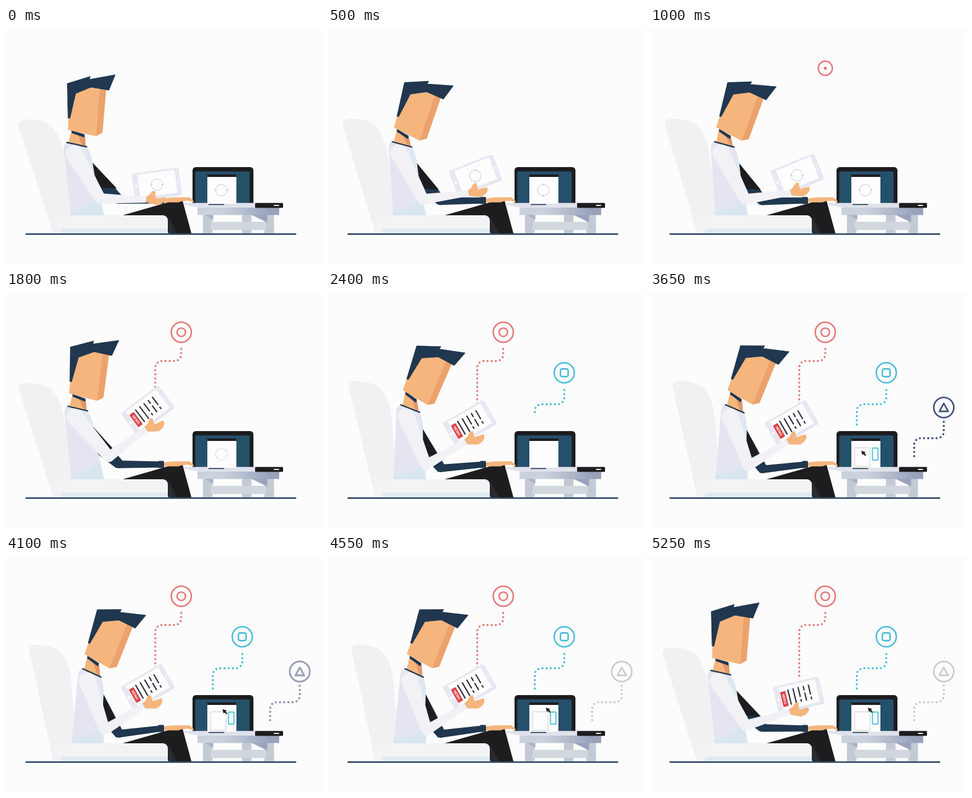
An HTML page with a canvas for the animation above (5.3 s loop, 576 by 431 pixels).

```html
<!DOCTYPE html>
<html lang="en">
<head>
<meta charset="utf-8">
<title>Connected devices</title>
<style>
html, body { margin: 0; width: 100%; height: 100%; overflow: hidden; background: #fcfcfc; }
canvas { display: block; width: 576px; height: 431px; }
</style>
</head>
<body>
<canvas id="stage"></canvas>
<script>
const W = 576, H = 431, LOOP = 5300, STEP = 50;
const canvas = document.getElementById('stage');
const c = canvas.getContext('2d');
const dpr = window.devicePixelRatio || 1;
canvas.width = W * dpr;
canvas.height = H * dpr;

const NAVY = '#20374f', BLACK = '#1d1d1f', SKIN = '#f5b57d', SHADE = '#eca26c';
const SHIRT = '#e4e5f0', SLEEVE = '#f1f1f6', MIST = '#d8e6f0', CHAIR = '#f1f1f3';
const RED = '#e57b79', CYAN = '#4fbfd9', INDIGO = '#3f527b', GREY = '#c8cad1';
const HIP = [140, 345];

const rest = { lean: 0, nod: 0, x: 275, y: 285, tilt: -7.5 };
const glance = { lean: 2.8, nod: 15.3, x: 268, y: 268, tilt: -22 };
const raise = { lean: 0.8, nod: 2.6, x: 258, y: 216, tilt: -37 };
const study = { lean: 9, nod: 18.6, x: 258, y: 239.5, tilt: -30 };
const bent = { ...study, lean: 12.2, nod: 16.8 };
const relax = { ...rest, x: 271, y: 254, tilt: -13.5 };
const MOVES = [[0, 600, rest, glance], [1100, 700, glance, raise], [1800, 550, raise, study],
  [2350, 2200, study, bent], [4550, 700, bent, relax]];

const rad = d => d * Math.PI / 180;
const clamp = v => Math.max(0, Math.min(1, v));
const part = (t, start, dur) => clamp((t - start) / dur);
const smooth = p => (1 - Math.cos(Math.PI * p)) / 2;
const easeOut = (p, n) => 1 - Math.pow(1 - p, n);
const mix = (a, b, p) => a + (b - a) * p;

function turn(x, y, deg, [ox, oy]) {
  const s = Math.sin(rad(deg)), k = Math.cos(rad(deg));
  return [ox + x * k - y * s, oy + x * s + y * k];
}

// Elbow of a two-bone arm, bending downwards.
function bend(a, b, upper, lower) {
  const dx = b[0] - a[0], dy = b[1] - a[1], d = Math.hypot(dx, dy);
  const along = (d * d + upper * upper - lower * lower) / (2 * d);
  const out = Math.sqrt(Math.max(0, upper * upper - along * along));
  return [a[0] + (dx * along - dy * out) / d, a[1] + (dy * along + dx * out) / d];
}

function poseAt(t) {
  const [start, dur, a, b] = MOVES.filter(m => m[0] <= t).pop();
  const p = smooth(part(t, start, dur)), pose = {};
  for (const key in a) pose[key] = mix(a[key], b[key], p);

  const lean = pose.lean;
  pose.body = (x, y) => turn(x - HIP[0], y - HIP[1], lean, HIP);
  pose.neck = pose.body(125, 187).map(v => v - lean * 0.3);
  pose.tab = [pose.x, pose.y];
  pose.wrist = turn(-23, 26, pose.tilt, pose.tab);
  pose.shoulder = pose.body(124, 229);
  pose.elbow = bend(pose.shoulder, pose.wrist, 95, 84);
  pose.farElbow = [204, 314 + lean * 0.9];
  pose.lift = smooth(part(t, 2650, 200)) * (1 - smooth(part(t, 2950, 200)));
  return pose;
}

function poly(color, pts, soft = 0) {
  c.fillStyle = c.strokeStyle = color;
  c.beginPath();
  pts.forEach(p => c.lineTo(p[0], p[1]));
  c.closePath();
  c.fill();
  if (!soft) return;
  c.lineWidth = soft;
  c.lineJoin = 'round';
  c.stroke();
}

function box(color, x, y, w, h, r = 0) {
  c.fillStyle = color;
  c.beginPath();
  c.roundRect(x, y, w, h, r);
  c.fill();
}

function frame(color, w, x, y, bw, bh, r) {
  c.strokeStyle = color;
  c.lineWidth = w;
  c.beginPath();
  c.roundRect(x, y, bw, bh, r);
  c.stroke();
}

function line(color, w, a, b, cap = 'round') {
  c.lineCap = cap;
  c.strokeStyle = color;
  c.lineWidth = w;
  c.beginPath();
  c.moveTo(...a);
  c.lineTo(...b);
  c.stroke();
}

function disc(color, x, y, r) {
  c.fillStyle = color;
  c.beginPath();
  c.arc(x, y, r, 0, 7);
  c.fill();
}

function limb(color, a, b, wa, wb) {
  const dx = b[0] - a[0], dy = b[1] - a[1], d = Math.hypot(dx, dy) * 2;
  const side = (p, w) => [p[0] - dy / d * w, p[1] + dx / d * w];
  poly(color, [side(a, wa), side(b, wb), side(b, -wb), side(a, -wa)]);
}

function group([x, y], deg, draw) {
  c.save();
  c.translate(x, y);
  c.rotate(rad(deg));
  draw();
  c.restore();
}

function pivot(at, deg, draw) {
  group(at, deg, () => {
    c.translate(-at[0], -at[1]);
    draw();
  });
}

function refresh(x, y, t, alpha) {
  c.globalAlpha = alpha;
  group([x, y], t * 0.18, () => {
    for (let k = 0; k < 2; k++) {
      c.rotate(Math.PI);
      c.strokeStyle = '#d6d7dd';
      c.lineWidth = 1.3;
      c.beginPath();
      c.arc(0, 0, 10.5, 0.15, 2.75);
      c.stroke();
      poly('#cfd0d8', [[8, 1], [13, 1], [10.5, -3]]);
    }
  });
  c.globalAlpha = 1;
}

function chairBack(lean) {
  pivot([100, 374], lean * 0.48, () => {
    c.fillStyle = CHAIR;
    c.beginPath();
    c.moveTo(86, 375);
    c.lineTo(22, 177);
    c.quadraticCurveTo(22, 168, 36, 167);
    c.lineTo(50, 167.5);
    c.bezierCurveTo(78, 168, 95, 184, 104, 225);
    c.lineTo(126, 345);
    c.lineTo(122, 375);
    c.fill();
  });
}

function seat() {
  box('#f3f3f5', 86, 342, 209, 33, [0, 9, 0, 0]);
  box('#e0eaf2', 100, 366, 195, 9);
}

function legs() {
  poly(BLACK, [[211, 342.5], [300, 317], [319, 312], [322, 316], [338, 375], [296, 375], [285, 345]]);
  poly('#2b2b2f', [[296, 345], [311, 375], [296, 375]]);
}

function table() {
  [359, 430, 471].forEach(x => box('#c3cad3', x, 340, 17.5, 35));
  box('#d0d7dd', 373, 354, 101, 15);
  poly('#9ba2bb', [[447, 341], [476, 341], [476, 355]]);
  poly('#a9b2c6', [[361, 341], [378, 341], [378, 350]]);
  const top = c.createLinearGradient(349, 0, 498, 0);
  top.addColorStop(0.3, '#cbd1de');
  top.addColorStop(0.9, '#98a2bb');
  box(top, 349, 328, 149, 13.5);
}

function laptop(t) {
  box(BLACK, 340, 254, 111, 68, [6, 6, 0, 0]);
  box('#25506a', 345, 262, 99, 58, 2);
  poly('#dfe2ec', [[323, 319.5], [454, 319.5], [454, 328], [352, 328], [326, 323]]);
  box('#fdfdfd', 367, 268, 53, 53);
  box(BLACK, 367, 267.5, 53, 4.5);
  refresh(392.5, 296, t, 1 - part(t, 1600, 600));

  c.save();
  c.beginPath();
  c.rect(367, 272, 53, 49);
  c.clip();
  const slide = start => 40 * (1 - easeOut(part(t, start, 600), 3));
  if (t > 2690) {
    frame('#d5d6da', 1.3, 373, 284.5 + slide(2690), 28, 34, 0);
    frame(CYAN, 2, 405.5, 285 + slide(2750), 10, 22, 1);
  }
  c.restore();

  c.globalAlpha = part(t, 3250, 150);
  const p = smooth(part(t, 3750, 500));
  group([mix(385, 397, p), mix(290, 277, p)], 0, () =>
    poly(BLACK, [[0, 0], [8, 2.4], [6, 4.2], [9, 7.8], [7.2, 9.4], [4, 6], [2.2, 8]]));
  c.globalAlpha = 1;
  line(NAVY, 1.8, [370, 322.3], [397, 322.3]);

  box(BLACK, 454, 319.5, 51, 9, 1.5);
  line('#f2f2f4', 1.8, [489, 324], [497, 324]);
}

function farArm({ farElbow: [x, y], lift, body }) {
  const wrist = [283, 315 - 9 * lift];
  const top = body(154, 242), low = body(160, 291);
  poly(NAVY, [top, [x + 8, y - 7], [x - 3, y + 7], low]);
  poly(BLACK, [top, [x - 2, y - 21], low]);
  limb(NAVY, [x, y], wrist, 14, 11);
  disc(NAVY, x + 1, y, 7);

  group([287, wrist[1]], -18 * lift, () => {
    poly(SKIN, [[0, -3], [14, -5], [46, -5.5], [53, -1], [55, 3], [46, 0], [35, 0.5], [27, 3], [0, 3]], 1);
    box(NAVY, -10, -6.5, 11, 13, 2);
  });
}

function torso(lean) {
  pivot(HIP, lean, () => {
    c.fillStyle = SHIRT;
    c.beginPath();
    c.moveTo(110, 209);
    c.quadraticCurveTo(104, 213, 105, 222);
    c.lineTo(117, 325);
    c.lineTo(120, 362);
    c.lineTo(184, 362);
    c.lineTo(163, 278);
    c.lineTo(157, 241);
    c.quadraticCurveTo(153, 224, 147, 218);
    c.fill();
    poly('#dbe8f2', [[148, 222], [156, 238], [163, 278], [176, 330], [157, 275]]);
    c.fillStyle = MIST;
    c.beginPath();
    c.moveTo(118, 336);
    c.quadraticCurveTo(150, 332, 164, 310);
    c.lineTo(171, 312);
    c.lineTo(184, 362);
    c.lineTo(120, 362);
    c.fill();
  });
}

function head({ neck, nod, body }) {
  const at = (x, y) => turn(x, y, nod, neck);
  poly(SKIN, [at(-6, 2), at(19, 9), body(145, 216), body(114, 209)]);
  poly('#df9668', [at(5, 5), at(19, 9), body(145, 216), body(139, 214)]);
  line(NAVY, 2.4, body(111, 209), body(147, 217));

  group(neck, nod, () => {
    poly(NAVY, [[-6, 0], [18, 7], [18, 13], [-5, 5]]);
    poly(SKIN, [[0, -72], [22, -84], [46, -84], [39, 10.5], [-12, -1], [-11, -24]]);
    poly(SHADE, [[46, -84], [58, -80], [51, 4], [39, 10.5]]);
    poly(NAVY, [[-13.5, -85.5], [28.5, -98.5], [27, -93], [74, -101.5], [62.5, -73.5], [30, -79], [2, -67.5], [-8.5, -22.5], [-11.5, -22.5]], 1);
  });
}

function tablet({ tab, tilt }, t) {
  group(tab, tilt, () => {
    box('#dfe5ef', -42, -23, 85, 49, 4);
    box('#e7e8f1', -43, -25, 86, 49, 4);
    box('#fdfdfe', -33, -21.5, 68, 42);
    disc('#fbfbfd', -38, 0, 2.6);
    line('#fbfbfd', 1.4, [39, -4], [39, 4]);
  });
  refresh(tab[0], tab[1] + 1, t, 1 - part(t, 1350, 150));

  const show = part(t, 1400, 200);
  if (!show) return;
  group(tab, tilt, () => {
    for (let i = 0; i < 5; i++) {
      const x = -17 + 9.6 * i, gap = 5 * Math.cos(Math.PI * i) - 1;
      const stroke = (a, b) => line('#2f303a', 2.3, [x, a], [x, mix(a, b, show)], 'butt');
      if (i < 2) stroke(-14.5, 14);
      else {
        stroke(-14.5, gap);
        stroke(gap + 4, 13);
      }
    }
    c.scale(show, show);
    box('#d9484b', -32, -13, 10, 28, 1.5);
    c.translate(-27, 1);
    c.rotate(Math.PI / 2);
    c.fillStyle = '#fff';
    c.font = 'bold 6px Inter, sans-serif';
    c.textAlign = 'center';
    c.textBaseline = 'middle';
    c.fillText('NEWS', 0, 0.4);
  });
}

function nearArm(pose, t) {
  const { wrist, shoulder, elbow } = pose;
  const spin = (pose.tilt + 30) * 0.55;
  const skin = pts => group(wrist, spin, () => poly(SKIN, pts, 1.5));
  skin([[-2, -3], [12, -8], [18, -8], [32, -13], [33.5, -8], [30, -1], [22, 4.5], [3, 4]]);
  tablet(pose, t);
  skin([[-3, -3], [4, -9], [8, -17.5], [12.5, -18.5], [14.5, -10], [17, -5], [13, 4], [3, 4]]);

  limb(SLEEVE, shoulder, elbow, 31, 20);
  disc(SLEEVE, ...shoulder, 15.5);
  limb(SLEEVE, elbow, wrist, 19, 10.5);
  disc(SLEEVE, ...elbow, 9.8);
}

// Dotted lead: down, left, down, with rounded bends.
function lead(color, x0, y0, x1, yMid, y1, p) {
  const r = 12, arc = r * Math.PI / 2;
  const a = yMid - r - y0, b = x0 - x1 - 2 * r;
  const total = a + b + 2 * arc + y1 - yMid - r;
  const point = s => {
    if (s < a) return [x0, y0 + s];
    s -= a;
    if (s < arc) return [x0 - r + r * Math.cos(s / r), yMid - r + r * Math.sin(s / r)];
    s -= arc;
    if (s < b) return [x0 - r - s, yMid];
    s -= b;
    if (s < arc) return [x1 + r - r * Math.sin(s / r), yMid + r - r * Math.cos(s / r)];
    return [x1, yMid + r + s - arc];
  };
  for (let s = 0; s <= total * p; s += 7.6) disc(color, ...point(s), 1.95);
}

function badge(color, x, y, age, shape) {
  const ring = easeOut(part(age, 0, 220), 2), core = easeOut(part(age, 80, 200), 2);
  c.strokeStyle = color;
  c.lineWidth = 2.8;
  c.lineJoin = 'round';
  c.beginPath();
  c.arc(x, y, 18.3 * ring, 0, 7);
  c.stroke();
  if (!core) return;
  c.beginPath();
  shape(x, y, core);
  c.stroke();
}

const circle = (x, y, q) => c.arc(x, y, 7.7 * q, 0, 7);
const square = (x, y, q) => c.roundRect(x - 7 * q, y - 7 * q, 14 * q, 14 * q, 3 * q);
function triangle(x, y, q) {
  c.moveTo(x, y - 7.5 * q);
  c.lineTo(x + 8 * q, y + 7 * q);
  c.lineTo(x - 8 * q, y + 7 * q);
  c.closePath();
}

function signals(t) {
  const off = part(t, 3900, 300);
  const send = (i, color, x, y, shape, ...path) => {
    const age = t - 900 - 981 * i;
    if (age <= 0) return;
    badge(color, x, y, age, shape);
    if (age > 180) lead(color, x, ...path, part(age, 180, 450));
  };
  send(0, RED, 319.5, 73.5, circle, 104, 272, 126, 226);
  send(1, CYAN, 430.7, 147.5, square, 179, 377, 205, 248);
  const third = color => send(2, color, 535.5, 211, triangle, 237, 481.5, 267, 306);
  if (off < 1) third(INDIGO);
  c.globalAlpha = off;
  if (off) third(GREY);
  c.globalAlpha = 1;
}

function draw(t) {
  c.setTransform(dpr, 0, 0, dpr, 0, 0);
  box('#fcfcfc', 0, 0, W, H);
  const pose = poseAt(t);
  chairBack(pose.lean);
  table();
  laptop(t);
  legs();
  farArm(pose);
  torso(pose.lean);
  seat();
  head(pose);
  signals(t);
  nearArm(pose, t);
  line('#2b4862', 2.8, [36.8, 376.3], [527.8, 376.3]);
}

const begin = performance.now();
function tick() {
  const t = (performance.now() - begin) % LOOP;
  draw(Math.floor(t / STEP) * STEP);
  requestAnimationFrame(tick);
}
tick();
</script>
</body>
</html>
```
